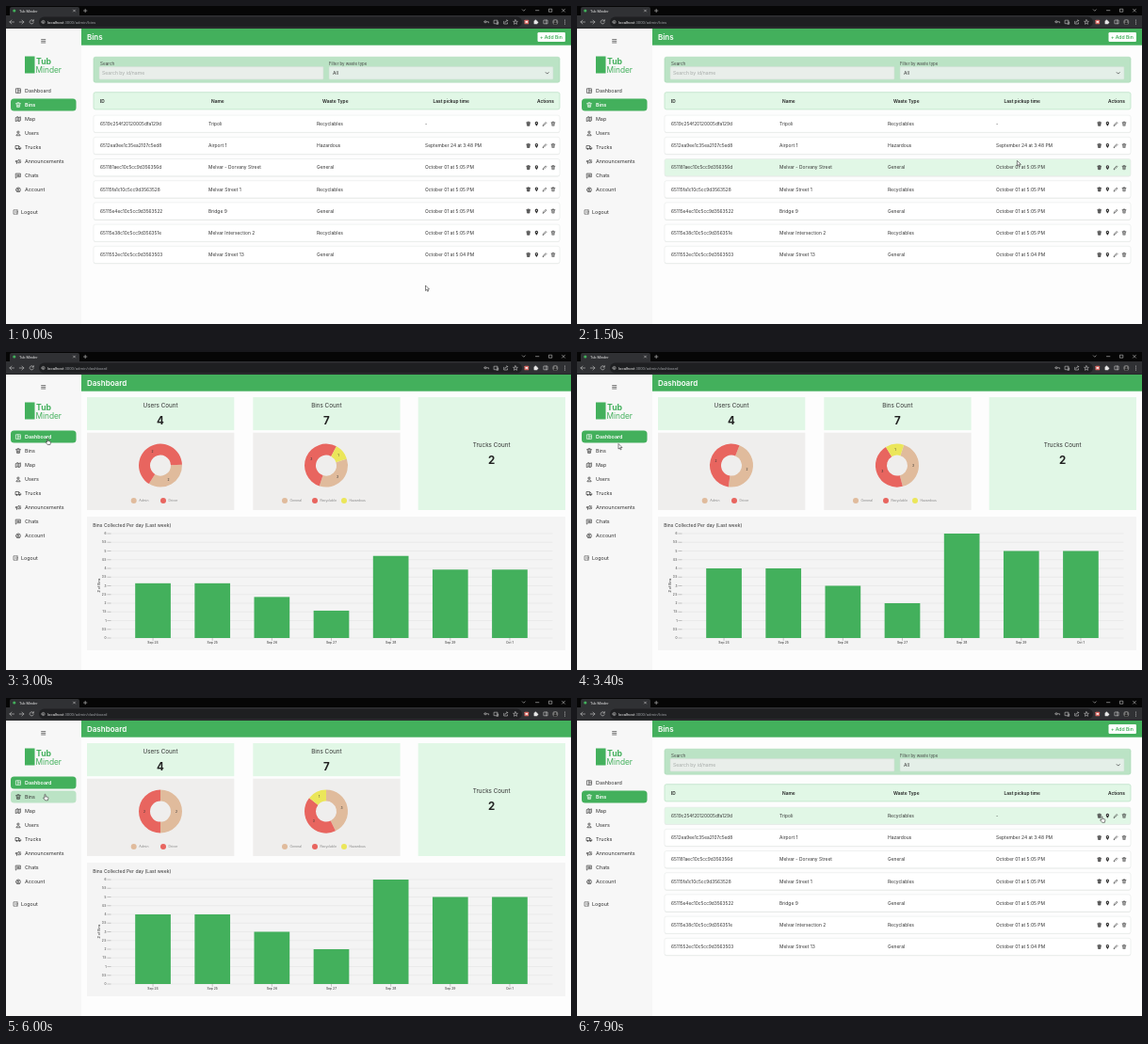
These frames come from a looping animation (600x338 px, 8 s). An HTML page:

```html
<!DOCTYPE html>
<html lang="en">
<head>
<meta charset="utf-8">
<title>Tub Minder</title>
<style>
  html, body { margin: 0; width: 100%; height: 100%; overflow: hidden; background: #fdfdfd; }
  svg { display: block; width: 600px; height: 338px; font-family: Inter, sans-serif; }
  .chrome { font-family: Roboto, sans-serif; }
  .line { fill: none; stroke-linecap: round; stroke-linejoin: round; }
</style>
</head>
<body>
<svg id="stage" viewBox="0 0 600 338"></svg>
<script>
const LOOP = 8000, OPEN_DASH = 2800, OPEN_BINS = 6200;
const GREEN = '#43b05c', MINT = '#e1f7e6', SAGE = '#bbe3c5', INK = '#333';
const TAN = '#e0bb9c', RED = '#e8655f', YELLOW = '#ebe65a';

const rect = (x, y, w, h, fill, r = 0, extra = '') =>
  `<rect x="${x}" y="${y}" width="${w}" height="${h}" rx="${r}" fill="${fill}" ${extra}/>`;
const text = (x, y, size, str, fill = INK, extra = '') =>
  `<text x="${x}" y="${y}" font-size="${size}" fill="${fill}" ${extra}>${str}</text>`;
const line = (d, color = INK, width = .7, extra = '') =>
  `<path class="line" d="${d}" stroke="${color}" stroke-width="${width}" ${extra}/>`;
const dot = (x, y, r, fill) => `<circle cx="${x}" cy="${y}" r="${r}" fill="${fill}"/>`;
const at = (x, y, body, extra = '') => `<g transform="translate(${x} ${y})" ${extra}>${body}</g>`;
const ring = (x, y, r) => `M${x - r} ${y}a${r} ${r} 0 1 0 ${2 * r} 0a${r} ${r} 0 1 0 ${-2 * r} 0`;
const MID = 'text-anchor="middle"', BOLD = 'font-weight="600"';

// Browser frame
function browser() {
  const pale = '#d5d5d5';
  const strokes = [
    'M71.5 4l2 2m0-2l-2 2', 'M82.5 5h3.4M84.2 3.3v3.4', 'M548.3 3.8l1.5 1.5 1.5-1.5',
    'M562.5 4.7h3.4', 'M576.8 3.2h3v3h-3z', 'M590.5 3.2l3 3m0-3l-3 3',
    'M8.5 17h-4.6m2-2l-2 2 2 2', 'M14.3 17h4.6m-2-2l2 2-2 2', 'M29 15.7a2.1 2.1 0 1 0 .2 2M29.3 14.5v1.6h-1.6',
    ring(39.5, 17, 1.6) + 'M39.5 16.8v.9', ring(509, 16.8, 1.1) + 'M510.2 16.8h2.4v1',
    'M518.5 15.2h3.5v3.5h-3.5zM521 17h1.7v2.3H521', 'M528.7 16.3v2.7h3.8v-1.2M530 17.5c.2-1.5 1-2 2.6-2m-.8-.9l.9.9-.9.9',
    'M541 14.7l.7 1.6 1.7.1-1.3 1.2.4 1.7-1.5-.9-1.5.9.4-1.7-1.3-1.2 1.7-.1z',
    'M571.3 15h3.8v3.8h-3.8zM573.7 15v3.8'
  ];
  return `<g class="chrome">` + rect(0, 0, 600, 24, '#060606') + rect(4, 1, 74, 12, '#303134', 2)
    + rect(0, 10, 600, 13.8, '#303134') + rect(35, 11.6, 513, 10.6, '#1e1f21', 5.3)
    + dot(8.8, 5, 1.6, GREEN) + text(14, 6.5, 3.9, 'Tub Minder', '#e4e4e4')
    + strokes.map(d => line(d, pale, .55)).join('')
    + rect(550.5, 14.7, 4.6, 4.6, '#d96a64', .6) + rect(551.6, 16, 2.4, 1.8, '#f4e9e8')
    + rect(560.6, 15.6, 3.7, 3.6, '#e5e5e5', .5) + dot(562.4, 15.4, .9, '#e5e5e5') + dot(564.4, 17.4, .9, '#e5e5e5')
    + dot(583.3, 17, 3, '#777') + dot(583.3, 16.2, 1, '#222') + rect(581.7, 17.4, 3.2, 2, '#222', 1)
    + [15, 17, 19].map(y => dot(593.5, y, .5, pale)).join('')
    + `<text x="44" y="18.5" font-size="4.25" fill="#f0f0f0">localhost<tspan id="path" fill="#9a9da1"></tspan></text></g>`;
}

// Sidebar
const NAV = [
  ['Dashboard', 'M-2.2-2.2h4.6v4.6h-4.6zM-.2-2.2v4.6M-.2 0h2.6'],
  ['Bins', 'M-1.8-1.2l.4 3.6h2.8l.4-3.6M-2.4-1.4h4.8M-.9-2.4h1.8M-.5 0v1.4M.6 0v1.4'],
  ['Map', 'M-2.4-1.6l1.6-.7 1.6.7 1.6-.7v4l-1.6.7-1.6-.7-1.6.7zM-.8-2.2v3.9M.8-1.5v3.8'],
  ['Users', ring(0, -1.1, 1.1) + 'M-2.1 2.2c0-2 4.2-2 4.2 0z'],
  ['Trucks', 'M-2.6-1.7h3.2v3.2h-3.2zM.6-.5h1.3l.9 1v1H.6' + ring(-1.4, 1.7, .5) + ring(1.6, 1.7, .5)],
  ['Announcements', 'M-2.3-.7h1.4l2-1.4v4l-2-1.4h-1.4zM-1.5.7v1.5M2-1l.6-.4M2.1 0h.7M2 .9l.6.4'],
  ['Chats', 'M-2.4-2.2h4.8v3.6h-3.6l-1.2 1.1zM-1.2-1h2.4M-1.2.2h2.4'],
  ['Account', ring(0, 0, 2.4) + ring(0, -.7, .8) + 'M-1.6 1.6c.7-1 2.5-1 3.2 0']
];
const navY = i => 90 + 15.05 * i;
function sidebar() {
  const items = NAV.map(([name, icon], i) =>
    `<g class="nav">` + rect(5, navY(i) - 6.5, 69.5, 13, 'none', 3.5)
    + at(13, navY(i), line(icon, 'currentColor', .65))
    + text(20, navY(i) + 1.9, 5.4, name, 'currentColor') + '</g>').join('');
  return rect(0, 23.8, 80, 315, '#f7f7f7')
    + line('M37.6 35.6h4.2M37.6 37.3h4.2M37.6 39h4.2', INK, .65)
    + rect(20, 53.5, 10.5, 18, GREEN)
    + text(32, 62.2, 8.7, 'Tub', GREEN, 'font-weight="700"') + text(31.5, 71, 8.3, 'Minder', GREEN)
    + items + line('M9.2 216.8H8v4.4h1.2M9.6 219h3m-1.2-1.3l1.3 1.3-1.3 1.3M10 216.8h2.4v.5M10 221.2h2.4v-.5', INK, .55)
    + text(16, 220.9, 5.4, 'Logout');
}

const header = title => rect(80, 23.8, 520, 17.9, GREEN) + text(86, 35.6, 8, title, '#fff', BOLD);

// Bins page
const ROWS = [
  ['6519c254f20120005dfa129d', 'Tripoli', 'Recyclables', '-'],
  ['6512ea9ee1c35ea2107c5ed8', 'Airport 1', 'Hazardous', 'September 24 at 3:48 PM'],
  ['651181aec10c5cc9d356356d', 'Melvar - Dorvany Street', 'General', 'October 01 at 5:05 PM'],
  ['65115fa1c10c5cc9d3563528', 'Melvar Street 1', 'Recyclables', 'October 01 at 5:05 PM'],
  ['65115e4ec10c5cc9d3563522', 'Bridge 9', 'General', 'October 01 at 5:05 PM'],
  ['65115e38c10c5cc9d356351e', 'Melvar Intersection 2', 'Recyclables', 'October 01 at 5:05 PM'],
  ['6511552ec10c5cc9d3563503', 'Melvar Street 13', 'General', 'October 01 at 5:04 PM']
];
const rowY = i => 125.3 + 23.2 * i;
function binsPage() {
  const can = 'M-1.5-1l.3 3h2.4l.3-3zM-2-1.4h4M-.7-2.2h1.4';
  const actions = y =>
    at(554.7, y, line(can, INK, .6, 'style="fill:#666"'))
    + at(563.4, y, `<path d="M0 2.4C-.5 1.3-1.7.4-1.7-.8a1.7 1.7 0 0 1 3.4 0C1.7.4.5 1.3 0 2.4z" fill="${INK}"/>` + dot(0, -.8, .6, '#fff'))
    + at(572, y, line('M-1.8 1.9l.3-1.1 2.6-2.6.8.8-2.6 2.6z', INK, .6))
    + at(581, y, line(can + 'M-.5-.2v1.4M.5-.2v1.4', INK, .5));
  const rows = ROWS.map((cells, i) => {
    const y = rowY(i);
    return rect(93, y - 8.5, 495, 18.3, '#e9ebe9', 2) + rect(93, y - 9.2, 495, 18.2, '#fff', 2, 'class="row" stroke="#e6e9e7" stroke-width=".6"')
      + cells.map((c, k) => text(100 + 115 * k, y + 1.7, k ? 4.95 : 4.8, c)).join('') + actions(y);
  }).join('');
  const heads = [[100, 'ID'], [218, 'Name'], [336, 'Waste Type'], [453.5, 'Last pickup time'], [564, 'Actions']];
  return header('Bins') + rect(564.5, 28, 29.5, 10, '#fff', 1.2) + text(567, 34.8, 5.1, '+ Add Bin', GREEN, BOLD)
    + rect(93, 54.2, 495, 27, SAGE, 2, 'stroke="#a9d9b5" stroke-width=".6"')
    + text(100, 62.6, 4.6, 'Search', '#444') + text(343, 62.8, 4.35, 'Filter by waste type', '#444')
    + rect(99, 64.6, 238, 13.3, '#e9eeea', 1, 'stroke="#d2ddd5" stroke-width=".6"')
    + rect(343, 64.6, 238, 13.3, '#e4efe8', 1, 'stroke="#cfdfd4" stroke-width=".6"')
    + text(102, 73, 5.1, 'Search by id/name', '#a6aaa8') + text(347, 73, 5, 'All')
    + line('M573.2 70.6l1.5 1.5 1.5-1.5')
    + rect(93, 91.7, 495, 18.2, MINT, 2, 'stroke="#b9e0c3" stroke-width=".7"')
    + heads.map(([x, s]) => text(x, 102.5, 4.85, s, '#222', BOLD)).join('') + rows;
}

// Dashboard page
const DAYS = ['Sep 24', 'Sep 25', 'Sep 26', 'Sep 27', 'Sep 28', 'Sep 29', 'Oct 1'];
const COUNTS = [4, 4, 3, 2, 6, 5, 5];
const BASE = 304, UNIT = 18.5, BAR_W = 37.7;
const barX = i => 137.2 + 63.15 * i;
const PIES = [
  { x: 164, parts: [2, 2], lag: [22, 8, 22] },
  { x: 340, parts: [3, 3, 1], lag: [18, 11, 20, 18] }
];
function dashPage() {
  const card = (x, h, label, n, y) => rect(x, 48, 156.3, h, MINT)
    + text(x + 78, y, 6.3, label, INK, MID) + text(x + 78, y + 18.3, 11.5, n, '#222', MID + ' font-weight="700"');
  const legend = (x, color, s) => dot(x, 158, 3, color) + text(x + 5.5, 159.2, 3.4, s, '#888');
  let axis = '';
  for (let k = 0; k <= 12; k++) {
    const y = BASE - k * UNIT / 2;
    axis += line(`M111 ${y}H580`, '#dedede', .5) + line(`M107.8 ${y}H111`, '#777', .4)
      + text(106.5, y + 1.2, 3.2, k / 2, INK, 'text-anchor="end"');
  }
  return header('Dashboard') + card(86, 35.2, 'Users Count', 4, 58.5) + card(262.3, 35.2, 'Bins Count', 7, 58.5)
    + card(437.7, 120, 'Trucks Count', 2, 101)
    + rect(86, 85.7, 156.3, 82.3, '#efeeed') + rect(262.3, 85.7, 156.3, 82.3, '#efeeed')
    + '<g id="pies"></g>'
    + legend(135.7, TAN, 'Admin') + legend(167, RED, 'Driver')
    + legend(296, TAN, 'General') + legend(328, RED, 'Recyclable') + legend(359, YELLOW, 'Hazardous')
    + rect(86, 175, 508, 142, '#f4f4f4') + text(92.3, 186.4, 5.05, 'Bins Collected Per day (Last week)')
    + axis + at(100.3, 248, text(0, 0, 3.6, '# of Bins', INK, MID + ' transform="rotate(-90)"'))
    + COUNTS.map((n, i) => rect(barX(i), BASE, BAR_W, 0, GREEN, 0, 'class="bar"')
      + line(`M${barX(i) + BAR_W / 2} ${BASE}v2.5`, '#777', .4)
      + text(barX(i) + BAR_W / 2, 310.4, 3.4, DAYS[i], INK, MID)).join('')
    + `<g id="tip">` + rect(-13, -17, 26, 12.4, '#d4d8d5', 1.8) + rect(-13, -17.4, 26, 12.2, '#fff', 1.8)
    + text(0, -9.5, 5, '', INK, MID) + '</g>';
}

const arrow = `<path d="M0 0v5.6l1.3-1.2.9 2 .9-.4-.9-2h1.8z" fill="#fff" stroke="#222" stroke-width=".55"/>`;
const hand = `<path d="M-.5 0c.5-.5 1 0 1 .4v1.9l2.3.5c.6.2.7.6.6 1.1l-.5 2.4H.2L-1.8 4c-.3-.6.3-1 .9-.5l.4.4z" fill="#fff" stroke="#222" stroke-width=".55"/>`;

const stage = document.getElementById('stage');
stage.innerHTML = rect(0, 0, 600, 338, '#fdfdfd') + sidebar()
  + `<g id="bins">${binsPage()}</g><g id="dash">${dashPage()}</g>` + browser()
  + `<g id="cursor"><g id="arrow">${arrow}</g><g id="hand">${hand}</g></g>`;
const $ = id => document.getElementById(id), all = sel => [...stage.querySelectorAll(sel)];
const navs = all('.nav'), rows = all('.row'), bars = all('.bar');
const show = (el, on) => el.setAttribute('display', on ? 'inline' : 'none');
const place = (el, [x, y]) => el.setAttribute('transform', `translate(${x} ${y})`);

// Pointer stops: time, x, y
const STOPS = [
  [0, 445.5, 297], [500, 447, 301], [1000, 446, 300], [1450, 467.5, 164.5], [1600, 467, 164],
  [2400, 109.5, 103], [2650, 46, 93], [2950, 44, 92], [3350, 44, 97.5], [3700, 44, 97.5],
  [4450, 540.5, 274], [4800, 540.5, 274], [5500, 44, 107], [5900, 41.5, 102.5], [6400, 41.5, 102.5],
  [7400, 554, 128], [7800, 557.5, 126], [8000, 557.5, 126]
];
function pointer(t) {
  const i = STOPS.findIndex(s => s[0] > t);
  const [t0, x0, y0] = STOPS[i - 1], [t1, x1, y1] = STOPS[i];
  const p = (t - t0) / (t1 - t0), e = p * p * (3 - 2 * p);
  return [x0 + (x1 - x0) * e, y0 + (y1 - y0) * e];
}

function drawPie({ x, parts, lag }, settle) {
  const total = parts.reduce((a, b) => a + b), colors = [TAN, RED, YELLOW], cy = 120.6;
  const polar = (deg, r) => {
    const a = deg * Math.PI / 180;
    return [x + r * Math.sin(a), cy - r * Math.cos(a)];
  };
  let sum = 0;
  return parts.map((n, i) => {
    const a = sum / total * 360 + lag[i] * settle;
    sum += n;
    const b = sum / total * 360 + lag[i + 1] * settle, big = +(b - a > 180), [lx, ly] = polar((a + b) / 2, 17);
    return `<path d="M${polar(a, 23)}A23 23 0 ${big} 1 ${polar(b, 23)}L${polar(b, 11)}A11 11 0 ${big} 0 ${polar(a, 11)}Z" fill="${colors[i]}"/>`
      + text(lx, ly + 1.2, 3.3, n, INK, MID);
  }).join('');
}

function draw(t) {
  const dash = t >= OPEN_DASH && t < OPEN_BINS, pos = pointer(t), [x, y] = pos;
  show($('dash'), dash);
  show($('bins'), !dash);
  $('path').textContent = ':3000/admin/' + (dash ? 'dashboard' : 'bins');

  let clickable = false;
  navs.forEach((el, i) => {
    const active = i === (dash ? 0 : 1), over = x > 5 && x < 74.5 && Math.abs(y - navY(i)) < 6.5;
    clickable ||= over;
    el.style.color = active ? '#fff' : INK;
    el.style.fontWeight = active ? 600 : 400;
    el.firstChild.setAttribute('fill', active ? GREEN : over ? SAGE : 'none');
  });
  rows.forEach((el, i) => {
    const over = !dash && x > 93 && x < 588 && Math.abs(y - rowY(i)) < 9.2;
    clickable ||= over && x > 551;
    el.setAttribute('fill', over ? MINT : '#fff');
  });

  if (dash) {
    const age = t - OPEN_DASH, grow = 1 - (1 - Math.min(1, age / 500)) ** 3;
    const settle = Math.max(0, (1000 - age) / 400) ** 2;
    $('pies').innerHTML = PIES.map(p => drawPie(p, settle)).join('');
    let hover = -1;
    bars.forEach((el, i) => {
      const h = COUNTS[i] * UNIT * grow;
      el.setAttribute('y', BASE - h);
      el.setAttribute('height', h);
      if (x > barX(i) && x < barX(i) + BAR_W && y < BASE && y > BASE - h) hover = i;
    });
    show($('tip'), hover >= 0);
    place($('tip'), [x, y]);
    if (hover >= 0) $('tip').lastChild.textContent = 'Count: ' + COUNTS[hover];
  }

  place($('cursor'), pos);
  show($('hand'), clickable);
  show($('arrow'), !clickable);
}

function tick() {
  draw(performance.now() % LOOP);
  requestAnimationFrame(tick);
}
tick();
</script>
</body>
</html>
```
